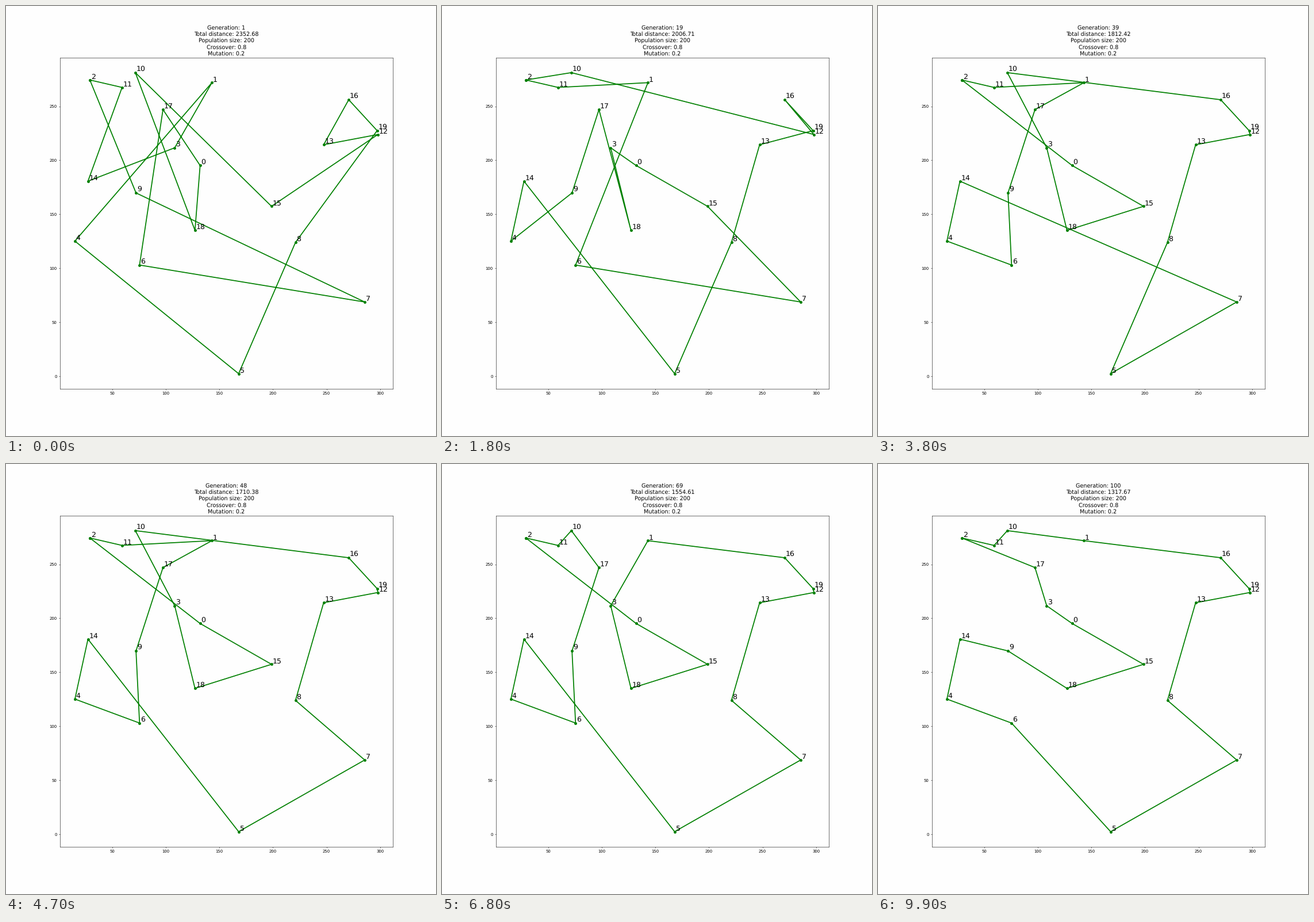
A matplotlib script that plays this animation: 748 by 748 pixels, repeating every 10 s.

```python
from math import dist

import matplotlib.pyplot as plt
from matplotlib.animation import FuncAnimation

plt.rcParams.update({"font.family": "DejaVu Sans", "text.hinting": "none"})

GENERATIONS = 100
PAPER = "#fefefe"
CITIES = [
    (132.1, 195.2), (143.1, 271.9), (29.25, 274.4), (108.4, 211.6),
    (15.3, 125.2), (168.01, 2.44), (75.6, 103.0), (285.6, 68.8),
    (221.05, 124.0), (72.3, 169.8), (71.68, 281.2), (59.3, 267.5),
    (297.9, 223.9), (247.295, 214.39), (27.48, 180.69), (198.7, 157.4),
    (270.7, 256.1), (97.45, 247.0), (127.3, 135.1), (297.2, 227.5),
]
START = [2, 9, 7, 6, 17, 0, 18, 10, 15, 12, 13, 16, 19, 8, 5, 4, 1, 3, 14, 11]

# Generation: moves, each putting some cities right before another one
MUTATIONS = {
    3: [([13], 8)],
    5: [([14], 4)],
    8: [([9, 17, 18, 3, 0, 15, 7, 6], 1)],
    21: [([12], 13)],
    27: [([7], 14)],
    36: [([6], 9), ([0, 15, 18, 3], 10)],
    46: [([7], 5)],
    52: [([3], 0)],
    68: [([3, 1], 16), ([10], 11)],
    74: [([18, 15, 0, 3], 17)],
    80: [([6], 14), ([14], 9)],
    84: [([11, 10], 1)],
}


def mutate(tour, moves):
    tour = list(tour)
    for cities, anchor in moves:
        for city in cities:
            tour.remove(city)
            tour.insert(tour.index(anchor), city)
    return tour


def evolve():
    tours = [START]
    for gen in range(2, GENERATIONS + 1):
        tours.append(mutate(tours[-1], MUTATIONS.get(gen, [])))
    return tours


TOURS = evolve()

fig, ax = plt.subplots(figsize=(15, 15), dpi=49.87, facecolor=PAPER)
ax.set_facecolor(PAPER)
path, = ax.plot(*zip(*CITIES), "o-", color="green", linewidth=2.5)
ax.set_xticks(range(50, 301, 50))
ax.set_yticks(range(0, 251, 50))
for i, (x, y) in enumerate(CITIES):
    ax.text(x + 1, y + 1, str(i), fontsize=18)
title = ax.set_title("", fontsize=14)


def update(frame):
    stops = [CITIES[i] for i in TOURS[frame]]
    loop = stops + stops[:1]
    length = sum(map(dist, loop, loop[1:]))
    path.set_data(*zip(*loop))
    title.set_text(
        f"Generation: {frame + 1}\n"
        f"Total distance: {length:.2f}\n"
        "Population size: 200\n"
        "Crossover: 0.8\n"
        "Mutation: 0.2"
    )
    return path, title


anim = FuncAnimation(fig, update, frames=GENERATIONS, interval=100,
                     repeat=True, repeat_delay=0)
plt.show()
```
